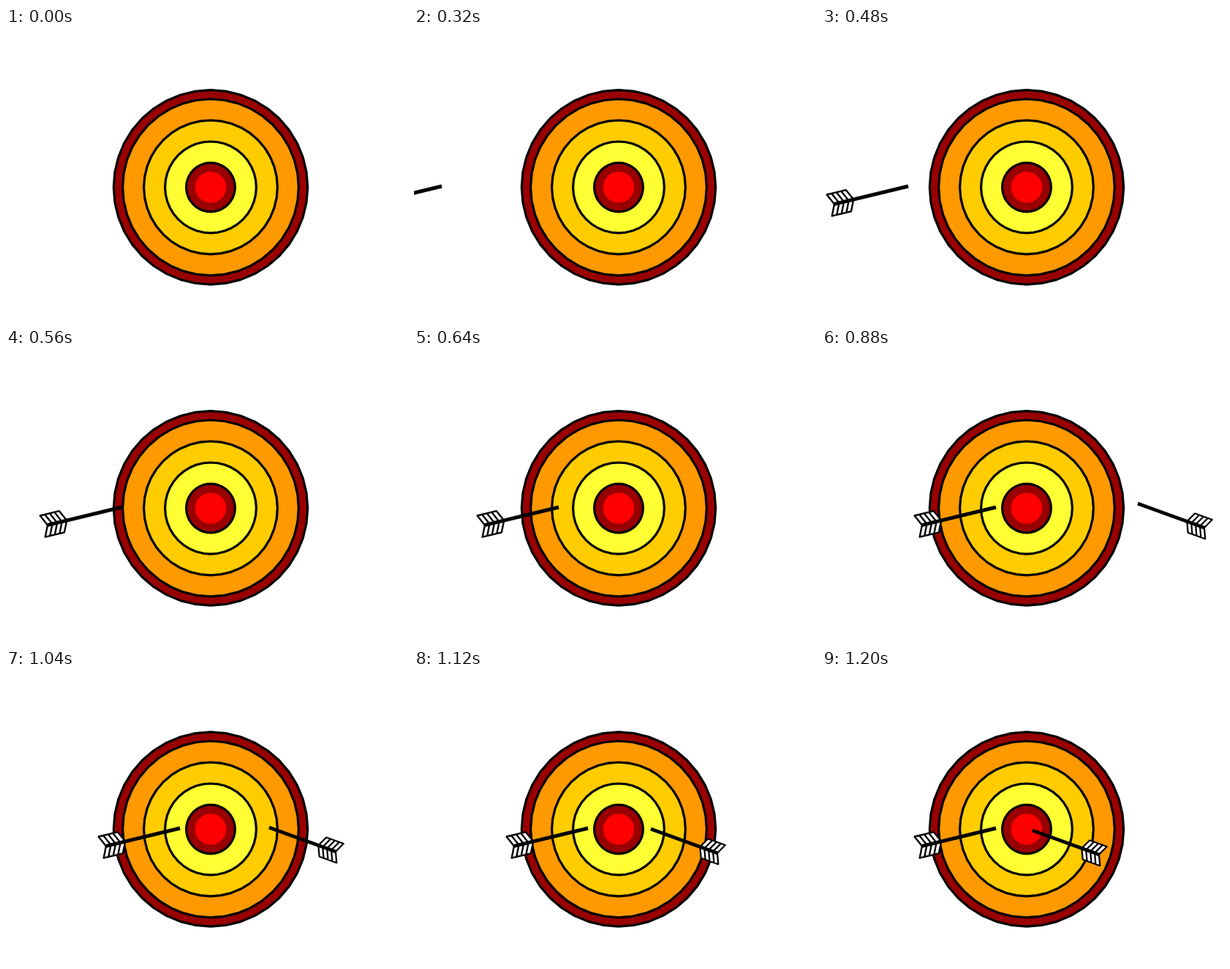
Write an HTML page that moves like this. It is 550x400 px and loops after 1.76 s.

```html
<!DOCTYPE html>
<html lang="en">
<head>
<meta charset="utf-8">
<title>Target and arrows</title>
<style>
  html, body { margin: 0; width: 100%; height: 100%; overflow: hidden; background: #fff; }
  svg { display: block; width: 550px; height: 400px; }
  polygon, path { stroke: #000; stroke-linejoin: round; }
</style>
</head>
<body>
<svg id="stage" viewBox="0 0 550 400"></svg>
<script>
const LOOP = 1760, STEP = 80, FLIGHT_STEPS = 5;
const SIDES = 40;
const SHAFT = 104, VANE = 27, SWEEP = 7, HEIGHT = 15, CELLS = 4;
const stage = document.getElementById('stage');

function add(parent, tag, attrs) {
  const el = document.createElementNS('http://www.w3.org/2000/svg', tag);
  for (const key in attrs) el.setAttribute(key, attrs[key]);
  return parent.appendChild(el);
}

// Rings are slightly faceted.
function ring(radius, fill, width = 3.2) {
  const points = Array.from({ length: SIDES }, (_, i) => {
    const a = i * 2 * Math.PI / SIDES;
    return [280 + radius * Math.cos(a), 217.4 + radius * Math.sin(a)];
  });
  add(stage, 'polygon', { points: points.join(' '), fill, 'stroke-width': width });
}

// A slanted vane on one side of the shaft, split into equal cells.
function vane(parent, side) {
  let d = `M${SHAFT - VANE} 0h${VANE}l${SWEEP} ${side * HEIGHT}h${-VANE}z`;
  for (let i = 1; i < CELLS; i++) {
    d += `M${SHAFT - i * VANE / CELLS} 0l${SWEEP} ${side * HEIGHT}`;
  }
  add(parent, 'path', { d, fill: '#fff', 'stroke-width': 2.4 });
}

// The tip is the origin; the shaft runs along +x.
function arrow() {
  const group = add(stage, 'g', {});
  vane(group, -1);
  vane(group, 1);
  add(group, 'path', { d: `M0 0h${SHAFT + 1}`, 'stroke-width': 5 });
  return group;
}

ring(132.7, '#990000');
['#ff9900', '#ffcc00', '#ffff33', '#990000'].forEach((fill, i) => ring(120.4 - 29 * i, fill));
ring(21.2, '#ff0000', 0);

const flights = [
  { el: arrow(), start: 4, x: 38, y: 216, dx: 40, dy: 0, pose: 'rotate(166.4)' },
  { el: arrow(), start: 10, x: 468, y: 209, dx: -36, dy: 2, pose: 'rotate(19.9) scale(.93)' }
];

function draw() {
  const step = Math.floor(performance.now() % LOOP / STEP);
  for (const { el, start, x, y, dx, dy, pose } of flights) {
    const n = Math.min(step - start, FLIGHT_STEPS);
    el.setAttribute('visibility', n < 0 ? 'hidden' : 'visible');
    el.setAttribute('transform', `translate(${x + n * dx} ${y + n * dy}) ${pose}`);
  }
  requestAnimationFrame(draw);
}
draw();
</script>
</body>
</html>
```
